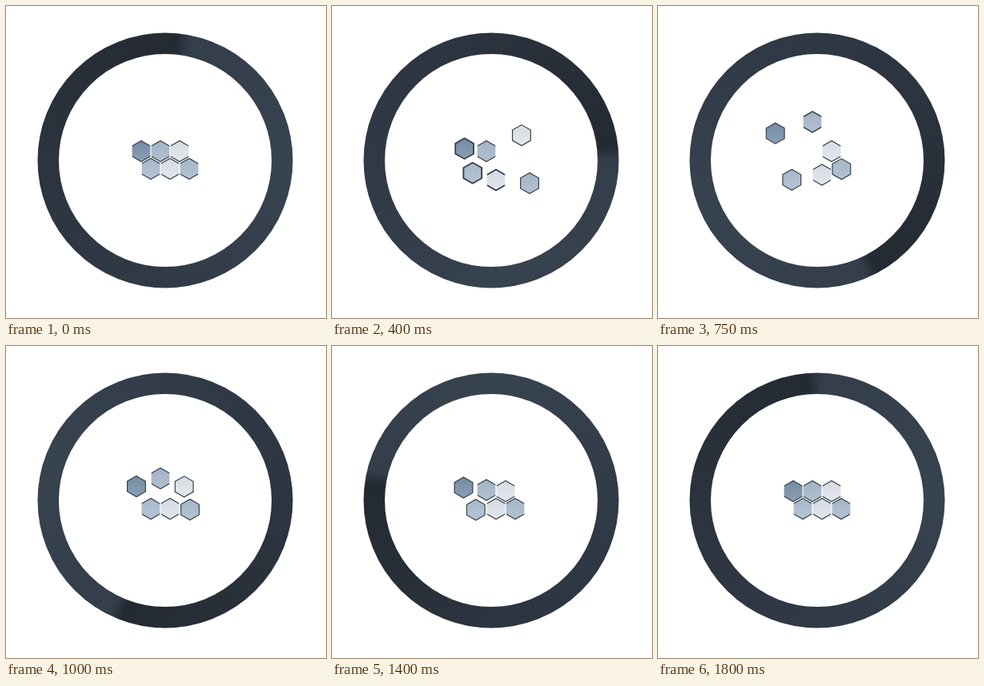
These frames come from a looping animation (400 px wide and 390 px high, 1850 ms). An HTML page with a canvas:

```html
<!DOCTYPE html>
<html lang="en">
<head>
<meta charset="utf-8">
<title>Hexagon loader</title>
<style>
html, body { margin: 0; width: 100%; height: 100%; overflow: hidden; background: #fff; }
canvas { display: block; }
</style>
</head>
<body>
<canvas id="stage" width="400" height="390"></canvas>
<script>
const ctx = document.getElementById('stage').getContext('2d');
const LOOP = 1850, STEP = 50, CX = 199, CY = 193;
const HALF_W = 11.4, HALF_H = 13;

// Each tile flies out (start to peak), falls back (peak to end), then makes a small hop.
const tiles = [
  { x: 169, y: 181.5, dx: -1, dy: -1, amp: 23, start: 300, peak: 700, end: 1155, hop: 4.5, hopAt: 1400, top: '#738aa1', low: '#8ba0b6' },
  { x: 193, y: 181.5, dx: 0, dy: -1, amp: 39, start: 485, peak: 800, end: 1159, hop: 6, hopAt: 1500, top: '#a0b3c6', low: '#b3c1d0' },
  { x: 217, y: 181.5, dx: 1, dy: -1, amp: 24, start: 0, peak: 300, end: 670, hop: 5.7, hopAt: 1000, top: '#d6dce4', low: '#e5e8ed' },
  { x: 181, y: 203.5, dx: -1, dy: 1, amp: 21, start: 300, peak: 600, end: 975, hop: 5, hopAt: 1300, top: '#a7b9cc', low: '#b5c4d4' },
  { x: 205, y: 203.5, dx: 0, dy: 1, amp: 18.6, start: 200, peak: 500, end: 945, hop: 4, hopAt: 1200, top: '#d3dae2', low: '#e3e7ec' },
  { x: 229, y: 203.5, dx: 1, dy: 1, amp: 18, start: 60, peak: 400, end: 785, hop: 4, hopAt: 1100, top: '#a4b6c8', low: '#b3c2d1' }
];

const progress = (t, a, b) => Math.min(1, Math.max(0, (t - a) / (b - a)));
const ease = p => Math.sin(p * Math.PI / 2) ** 2;

function drawRing(t) {
  const seam = (8.3 - 90) * Math.PI / 180 + 2 * Math.PI * t / LOOP;
  const shade = ctx.createConicGradient(seam - 0.05, CX, CY);
  [[0, '#242a32'], [0.018, '#343e4b'], [0.25, '#37434f'], [0.5, '#303a46'],
   [0.75, '#2b333e'], [1, '#242a32']].forEach(s => shade.addColorStop(...s));
  ctx.strokeStyle = shade;
  ctx.lineWidth = 26.5;
  ctx.beginPath();
  ctx.arc(CX, CY, 146.25, 0, 2 * Math.PI);
  ctx.stroke();
}

function drawTile(tile, t) {
  const rise = progress(t, tile.start, tile.peak);
  const fall = progress(t, tile.peak, tile.end);
  const hop = ease(1 - Math.min(1, Math.abs(t - tile.hopAt) / 150));
  const shift = tile.amp * ease(rise) * ease(1 - fall) + tile.hop * hop;
  const sideways = tile.dx && shift > 0.1;

  ctx.save();
  ctx.translate(tile.x + tile.dx * shift, tile.y + tile.dy * shift);
  const fill = ctx.createLinearGradient(0, -HALF_H, 0, HALF_H);
  fill.addColorStop(0, tile.top);
  fill.addColorStop(1, tile.low);
  const corner = HALF_H / 2;

  ctx.beginPath();
  ctx.moveTo(-HALF_W, -corner);
  ctx.lineTo(0, -HALF_H);
  ctx.lineTo(HALF_W, -corner);
  ctx.lineTo(HALF_W, corner);
  ctx.lineTo(0, HALF_H);
  ctx.lineTo(-HALF_W, corner);
  ctx.closePath();
  ctx.fillStyle = fill;
  ctx.fill();

  // The vertical edges only show while a tile is moved sideways.
  if (!sideways) {
    ctx.beginPath();
    ctx.rect(-HALF_W, -20, 2 * HALF_W, 40);
    ctx.clip();
    ctx.beginPath();
    for (const s of [-1, 1]) {
      ctx.moveTo(-HALF_W, s * corner);
      ctx.lineTo(0, s * HALF_H);
      ctx.lineTo(HALF_W, s * corner);
    }
  }
  ctx.strokeStyle = '#323d49';
  ctx.lineWidth = 1.15 + 0.8 * Math.sin(Math.PI * rise);
  ctx.stroke();
  ctx.restore();
}

function draw(now) {
  const t = Math.floor((now % LOOP) / STEP) * STEP;
  ctx.fillStyle = '#fff';
  ctx.fillRect(0, 0, 400, 390);
  drawRing(t);
  tiles.forEach(tile => drawTile(tile, t));
}

let origin;
function tick(now) {
  origin ??= now;
  draw(now - origin);
  requestAnimationFrame(tick);
}
draw(0);
requestAnimationFrame(tick);
</script>
</body>
</html>
```
